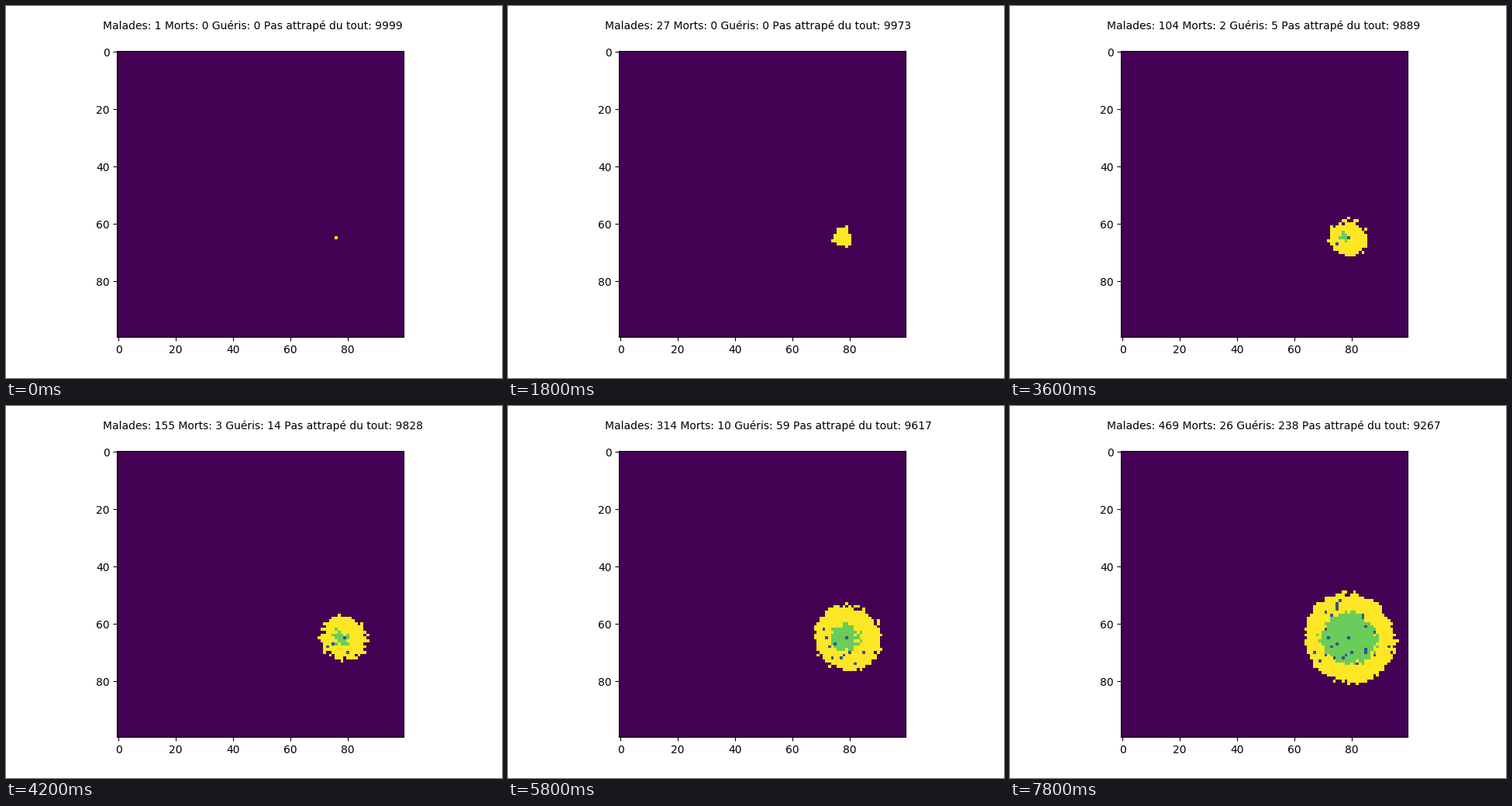
Write a matplotlib script that moves like this. It is 640x480 px and loops after 8000 ms.

```python
import numpy as np
import matplotlib.pyplot as plt
from matplotlib.animation import FuncAnimation

plt.rcParams["text.kerning_factor"] = 6

SIZE = 100
FRAMES, INTERVAL = 40, 200
START = (76, 65)
HEALTHY, DEAD, CURED, SICK = 0, 0.25, 0.77, 1

# Key points of the epidemic: step, ever infected, dead, cured
CURVE = np.array([(0, 1, 0, 0), (9, 27, 0, 0), (15, 77, 0, 0),
                  (18, 111, 2, 5), (25, 273, 6, 32), (29, 383, 10, 59),
                  (35, 586, 18, 148), (39, 733, 26, 238), (40, 775, 27, 262)])


def counts(step):
    """Ever infected, dead and cured; areas grow with the square of time."""
    return [int(round(np.interp(step, CURVE[:, 0], np.sqrt(col)) ** 2))
            for col in CURVE[:, 1:].T]


def spread(rng):
    """Rank value of each cell: low values are infected first."""
    y, x = np.mgrid[:SIZE, :SIZE]
    dy = y - START[1]
    # The centre of the outbreak drifts to the right as it grows
    drift = 3.6 * (1 - np.exp(-np.hypot(x - START[0], dy) / 5))
    dx = x - START[0] - drift
    stretch = 1 + 0.04 * np.sin(2 * np.arctan2(dy, dx))
    score = np.hypot(dx, dy) / stretch + rng.normal(0, 0.6, x.shape)
    score[START[1], START[0]] = -9
    return score.ravel()


def simulate(rng):
    """Grids for all steps."""
    score = spread(rng)
    catch_order = np.argsort(score)
    cure_order = np.argsort(score + rng.normal(0, 0.35, score.shape))
    victims, grids = [], []
    for step in range(FRAMES + 1):
        caught, dead, cured = counts(step)
        cells = np.full(SIZE * SIZE, float(HEALTHY))
        cells[catch_order[:caught]] = SICK
        alive = cure_order[~np.isin(cure_order, victims)]
        cells[alive[:cured]] = CURED
        cells[victims] = DEAD
        sick = np.flatnonzero(cells == SICK)
        new = rng.choice(sick, dead - len(victims), replace=False)
        cells[new] = DEAD
        victims.extend(int(v) for v in new)
        grids.append(cells.reshape(SIZE, SIZE))
    return grids


def caption(step):
    caught, dead, cured = counts(step)
    return (f"Malades: {caught - dead - cured} Morts: {dead} Guéris: {cured} "
            f"Pas attrapé du tout: {SIZE * SIZE - caught}")


grids = simulate(np.random.default_rng(4))
fig, ax = plt.subplots(figsize=(6.4, 4.8), dpi=100)
image = ax.imshow(grids[0], cmap="viridis", vmin=HEALTHY, vmax=SICK)
label = ax.text(-0.05, 1.075, "", transform=ax.transAxes, fontsize=10)


def update(frame):
    # Once started, the grid runs one step ahead of the caption
    image.set_data(grids[frame + 1 if frame else 0])
    label.set_text(caption(frame))
    return image, label


anim = FuncAnimation(fig, update, frames=FRAMES, interval=INTERVAL,
                     repeat=True, repeat_delay=0)
plt.show()
```
